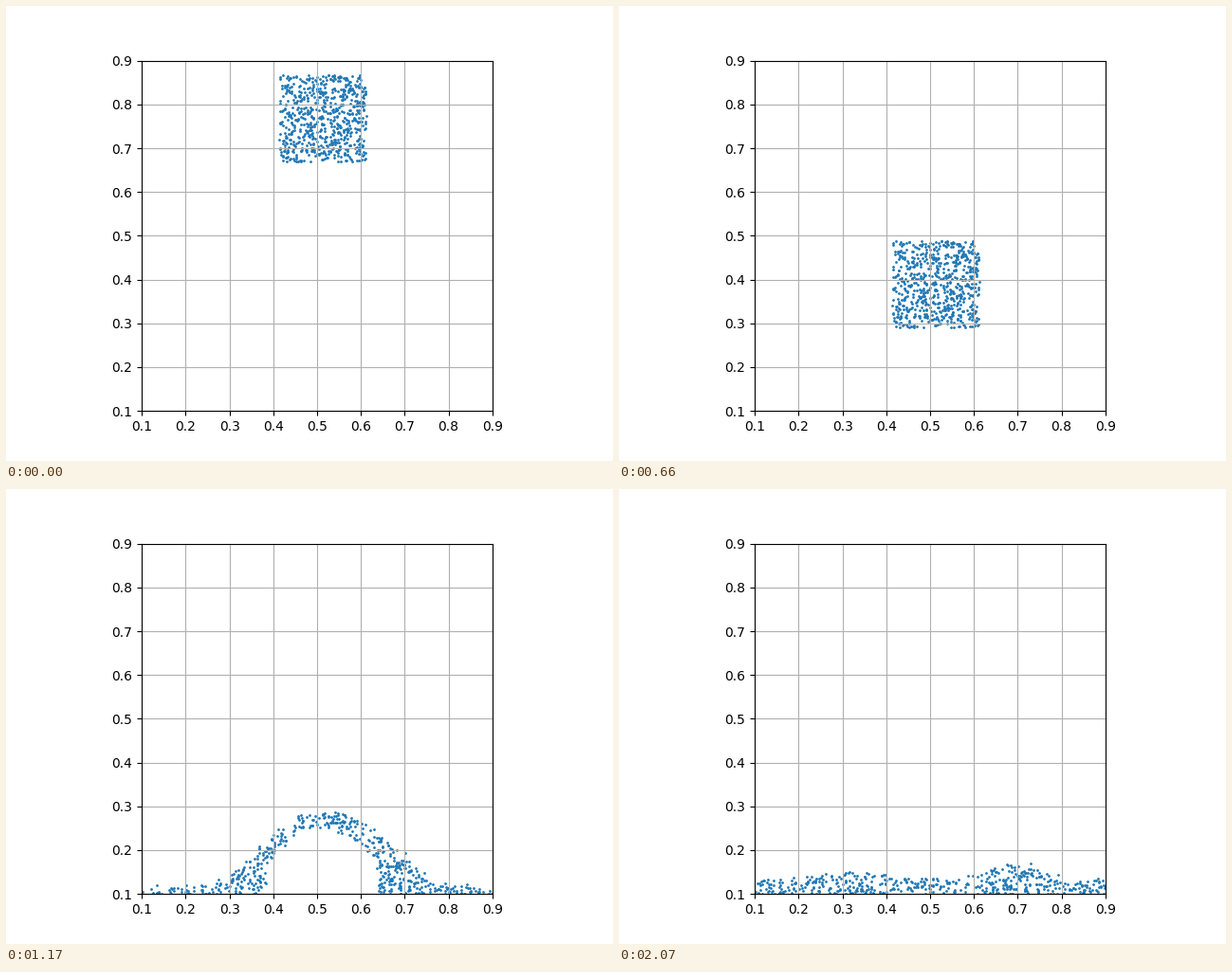
Write a matplotlib script that moves like this. It is 640x480 px and loops after 2100 ms.

```python
import numpy as np
import matplotlib.pyplot as plt
from matplotlib.animation import FuncAnimation

FRAMES, INTERVAL = 70, 30
N = 680
FLOOR = 0.085
FALL_END = 27      # last step of pure free fall
SETTLE = 4.0       # time constant of the final settling, in steps
STATIC_X = 0.28    # sand left of this is at rest once the arch comes down

rng = np.random.default_rng(4)
u, v = rng.random((2, N))
jitter = rng.normal(0, 1, (N, 2)) * [0.005, 0.004]
X = np.linspace(0.03, 0.97, 1500)


def vault(center, half, top, drop, power=2):
    """Curved roof of limited width, floor level elsewhere."""
    d = np.abs(X - center) / half
    return np.where(d < 1, top - drop * d**power, FLOOR)


def bell(center, width, height, power=2):
    return height * np.exp(-(np.abs(X - center) / width) ** power)


def fill(rank, hi, lo=FLOOR, start=0.0):
    """Spread the grains evenly between two outlines, ordered by rank."""
    lo = lo + 0 * X
    area = np.cumsum(np.where(X >= start, np.maximum(hi - lo, 0), 0))
    x = np.interp(rank, area / area[-1], X)
    bottom, top = np.interp(x, X, lo), np.interp(x, X, hi)
    return np.column_stack([x, bottom + (top - bottom) * v]) + jitter


impact = fill(u, vault(0.515, 0.155, 0.26, 0.175, 4))
dome = fill(u, vault(0.52, 0.27, 0.288, 0.27, 1.8),
            vault(0.51, 0.105, 0.18, 0.08))
arch = fill(u, 0.113 + bell(0.52, 0.18, 0.174, 2.5),
            vault(0.51, 0.13, 0.25, 0.085, 2.2))
mounds = 0.13 + bell(0.32, 0.13, 0.02)
bridge = fill(u, mounds + bell(0.67, 0.08, 0.042) + bell(0.55, 0.1, 0.055),
              vault(0.53, 0.125, 0.175, 0.06))

# The left heap stays; only the grains to its right come to a new rest.
still = bridge[:, 0] - jitter[:, 0] < STATIC_X
u0 = u[still].max()
heaps = fill(np.clip((u - u0) / (1 - u0), 0, 1),
             mounds + bell(0.69, 0.08, 0.036),
             vault(0.5, 0.09, 0.104, 0), STATIC_X)
rest = np.where(still[:, None], bridge, heaps)

times = [28, 31, 39, 48]
poses = [impact, dome, arch, bridge]


def slope(i):
    """Velocity of every grain at key i."""
    if i == len(poses) - 1:
        return (rest - bridge) / SETTLE
    a, b = max(i - 1, 0), i + 1
    return (poses[b] - poses[a]) / (times[b] - times[a])


slopes = [slope(i) for i in range(len(poses))]


def grains(k):
    if k <= FALL_END:
        drop = 0.00049 * k + 0.00076 * k * k
        return np.column_stack([0.414 + 0.198 * u, 0.669 + 0.198 * v - drop])
    if k >= times[-1]:
        return rest + (bridge - rest) * np.exp(-(k - times[-1]) / SETTLE)
    i = np.searchsorted(times, k, side="right") - 1
    h = times[i + 1] - times[i]
    t = (k - times[i]) / h
    s = 1 - t
    return ((1 + 2 * t) * s * s * poses[i] + t * s * s * h * slopes[i]
            + t * t * (3 - 2 * t) * poses[i + 1] - t * t * s * h * slopes[i + 1])


fig, ax = plt.subplots(figsize=(6.4, 4.8), dpi=100)
ax.set_aspect("equal")
ax.set_xlim(0.1, 0.9)
ax.set_ylim(0.1, 0.9)
ticks = np.arange(1, 10) / 10
ax.set_xticks(ticks)
ax.set_yticks(ticks)
ax.grid(True)
sand = ax.scatter(*grains(0).T, s=1)


def update(k):
    sand.set_offsets(grains(k))
    return (sand,)


anim = FuncAnimation(fig, update, frames=FRAMES, interval=INTERVAL, repeat=True)
plt.show()
```
